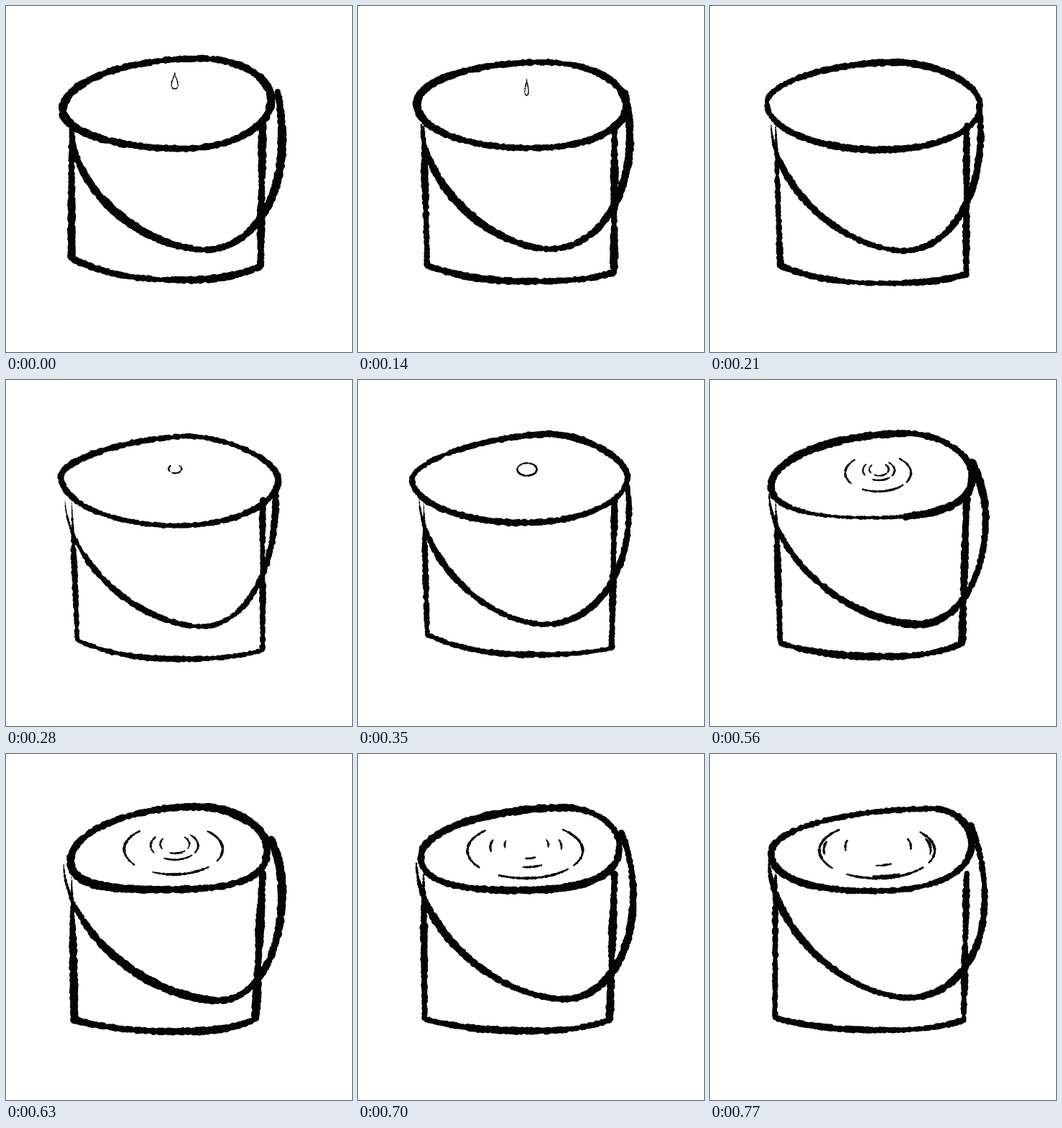
Animation of 480 by 480 pixels, one loop 840 ms. Source, as an HTML page with a canvas:

```html
<!DOCTYPE html>
<html lang="en">
<head>
<meta charset="utf-8">
<title>Bucket</title>
<style>
  html, body { margin: 0; width: 100%; height: 100%; overflow: hidden; background: #fff; }
  canvas { display: block; width: 480px; height: 480px; }
</style>
</head>
<body>
<canvas id="stage" width="480" height="480"></canvas>
<script>
const ctx = document.getElementById('stage').getContext('2d');
const STEP = 70, COUNT = 12, INK = '#050505';
const QUARTER = Math.PI / 2;
const TOP_LEFT = [91, 168], TOP_RIGHT = [356, 166], MID_X = 245;

// Key drawings by step: the extremes of the rim, the foot of the bucket and the handle.
// upper and lower set how square the rim is, press how hard strokes start, open a gap in the rim.
const poses = {
  0: { left: [79, 145], top: [270, 73], right: [368, 130], bottom: [245, 198], upper: 2, lower: 2,
    footLeft: [91, 350], sag: 380, footRight: [353, 361],
    start: [92, 178], low: [275, 338], outer: [383, 185], end: [377, 119], weight: 9.5, press: 0.7, open: 0 },
  2: { left: [82, 135], top: [258, 78], right: [372, 138], bottom: [240, 197], upper: 2, lower: 2.1,
    footLeft: [96, 360], sag: 382, footRight: [355, 370],
    start: [88, 165], low: [265, 337], outer: [377, 180], end: [371, 119], weight: 9, press: 0.35, open: 0 },
  4: { left: [76, 133], top: [255, 78], right: [378, 137], bottom: [238, 202], upper: 1.65, lower: 2,
    footLeft: [99, 361], sag: 387, footRight: [356, 375],
    start: [82, 167], low: [270, 342], outer: [374, 165], end: [374, 155], weight: 7.2, press: 0.15, open: 0 },
  5: { left: [75, 137], top: [268, 75], right: [374, 134], bottom: [230, 198], upper: 1.65, lower: 2,
    footLeft: [96, 353], sag: 381, footRight: [352, 372],
    start: [85, 165], low: [258, 339], outer: [376, 180], end: [373, 146], weight: 7.6, press: 0.15, open: 0 },
  7: { left: [80, 145], top: [280, 75], right: [365, 137], bottom: [235, 194], upper: 1.9, lower: 2.1,
    footLeft: [100, 361], sag: 382, footRight: [353, 363],
    start: [84, 162], low: [280, 336], outer: [382, 190], end: [358, 110], weight: 8.2, press: 0.15, open: 1 },
  9: { left: [90, 146], top: [265, 73], right: [362, 130], bottom: [215, 188], upper: 1.9, lower: 2.8,
    footLeft: [95, 369], sag: 385, footRight: [346, 368],
    start: [80, 154], low: [295, 342], outer: [383, 190], end: [367, 117], weight: 9.8, press: 0.15, open: 0 },
  11: { left: [85, 137], top: [310, 76], right: [363, 122], bottom: [225, 190], upper: 1.95, lower: 2.3,
    footLeft: [90, 366], sag: 383, footRight: [352, 369],
    start: [82, 150], low: [275, 338], outer: [381, 200], end: [362, 98], weight: 8.2, press: 0.4, open: 0 }
};

let seed = 1;
function random() {
  seed = (seed * 16807) % 2147483647;
  return seed / 2147483647;
}

const lerp = (a, b, t) => a + (b - a) * t;
const line = (a, b, t) => [lerp(a[0], b[0], t), lerp(a[1], b[1], t)];

// Superelliptic corner that leaves `side` vertically and reaches `cap` horizontally.
function bend(side, cap, power, angle) {
  const curve = v => Math.pow(Math.abs(v), 2 / power);
  return [lerp(cap[0], side[0], curve(Math.cos(angle))), lerp(side[1], cap[1], curve(Math.sin(angle)))];
}

// Stamps uneven dots along a path for a dry, ragged edge.
function brush(path, width) {
  let last = [-99, -99];
  ctx.beginPath();
  for (let i = 0; i <= 2400; i++) {
    const t = i / 2400, [px, py] = path(t), w = width(t);
    if (w < 0.4 || Math.hypot(px - last[0], py - last[1]) < 1.5) continue;
    last = [px, py];
    const rough = Math.min(1, w / 7);
    const x = px + (random() - 0.5) * rough;
    const y = py + (random() - 0.5) * rough;
    const r = w / 2 + (random() - 0.5) * 2.2 * rough;
    ctx.moveTo(x + r, y);
    ctx.arc(x, y, r, 0, 7);
  }
  ctx.fill();
}

// Stroke weight that swells and thins, starting from the given pressure.
function swell(weight, press = 1) {
  const phase = random() * 2 * Math.PI;
  return t => weight * (1 + 0.16 * Math.sin(4 * Math.PI * t + phase)) * Math.min(1, press + 5 * t);
}

function drawRim(p) {
  const weight = swell(p.weight);
  const path = t => {
    const c = Math.cos(t * 4 * QUARTER), s = Math.sin(t * 4 * QUARTER);
    return bend(c > 0 ? p.right : p.left, s > 0 ? p.bottom : p.top,
      s > 0 ? p.lower : p.upper, Math.acos(Math.abs(c)));
  };
  const ink = t => {
    const degrees = t * 360;
    if (degrees < 75) return 1;
    return Math.max(0, Math.min(1, (degrees - 106) / 45));
  };
  brush(path, t => weight(t) * lerp(1, ink(t), p.open));
}

function drawBody(p) {
  const path = t => {
    if (t < 0.4) return line(TOP_LEFT, p.footLeft, t / 0.4);
    const s = (t - 0.7) / 0.3, foot = s < 0 ? p.footLeft : p.footRight;
    return [lerp(MID_X, foot[0], Math.abs(s)), lerp(p.sag, foot[1], Math.abs(s) ** 2.5)];
  };
  brush(path, swell(p.weight * 0.92, p.press));
  brush(t => line(TOP_RIGHT, p.footRight, t), swell(p.weight));
}

function drawHandle(p) {
  const path = t => {
    if (t < 0.5) return bend(p.start, p.low, 1.75, t / 0.5 * QUARTER);
    if (t < 0.8) return bend(p.outer, p.low, 2.1, (0.8 - t) / 0.3 * QUARTER);
    const u = (t - 0.8) / 0.2;
    return [lerp(p.outer[0], p.end[0], u * u), lerp(p.outer[1], p.end[1], u)];
  };
  brush(path, swell(p.weight, p.press));
}

function drawDrop(step) {
  const path = t => {
    const a = t * 4 * QUARTER;
    return [234 + (7 - 1.5 * step) * Math.sin(a) * Math.sin(a / 2) ** 2, 104 + 4.5 * step - 11 * Math.cos(a)];
  };
  brush(path, () => 1.7);
}

// Each ring spreads from its birth, broken into a left, a lower and a right dash.
function drawRipples(step) {
  [3, 4.8, 6].forEach((birth, i) => {
    const age = step - birth;
    if (age < 1) return;
    const rx = Math.min(80, 6 * 1.5 ** age), ry = rx * (0.68 - 0.0025 * rx);
    const cx = 235 - rx * 0.04, cy = 122 + rx * 0.15;
    const fade = i && step > 9 ? 0.4 : 1;
    for (const middle of [185, 80, -8]) {
      const half = (32 + 12 * random() + 55 * Math.exp(-3 * (step - 5) ** 2)) * fade;
      const path = t => {
        const a = (middle + lerp(-half, half, t)) / 90 * QUARTER;
        return [cx + rx * Math.cos(a), cy + ry * Math.sin(a)];
      };
      brush(path, t => (2.4 + rx / 60) * (0.7 + 0.3 * Math.sin(Math.PI * t)));
    }
  });
}

function poseAt(step) {
  if (poses[step]) return poses[step];
  const a = poses[step - 1], b = poses[step + 1], mixed = {};
  for (const key in a) mixed[key] = Array.isArray(a[key]) ? line(a[key], b[key], 0.5) : lerp(a[key], b[key], 0.5);
  return mixed;
}

function draw(step) {
  seed = 421100 + step * 9770131;
  ctx.fillStyle = '#fff';
  ctx.fillRect(0, 0, 480, 480);
  ctx.fillStyle = INK;
  const pose = poseAt(step);
  drawRim(pose);
  drawBody(pose);
  drawHandle(pose);
  if (step < 3) drawDrop(step);
  drawRipples(step);
}

let shown = -1;
function tick() {
  const step = Math.floor(performance.now() / STEP) % COUNT;
  if (step !== shown) draw(shown = step);
  requestAnimationFrame(tick);
}
tick();
</script>
</body>
</html>
```
